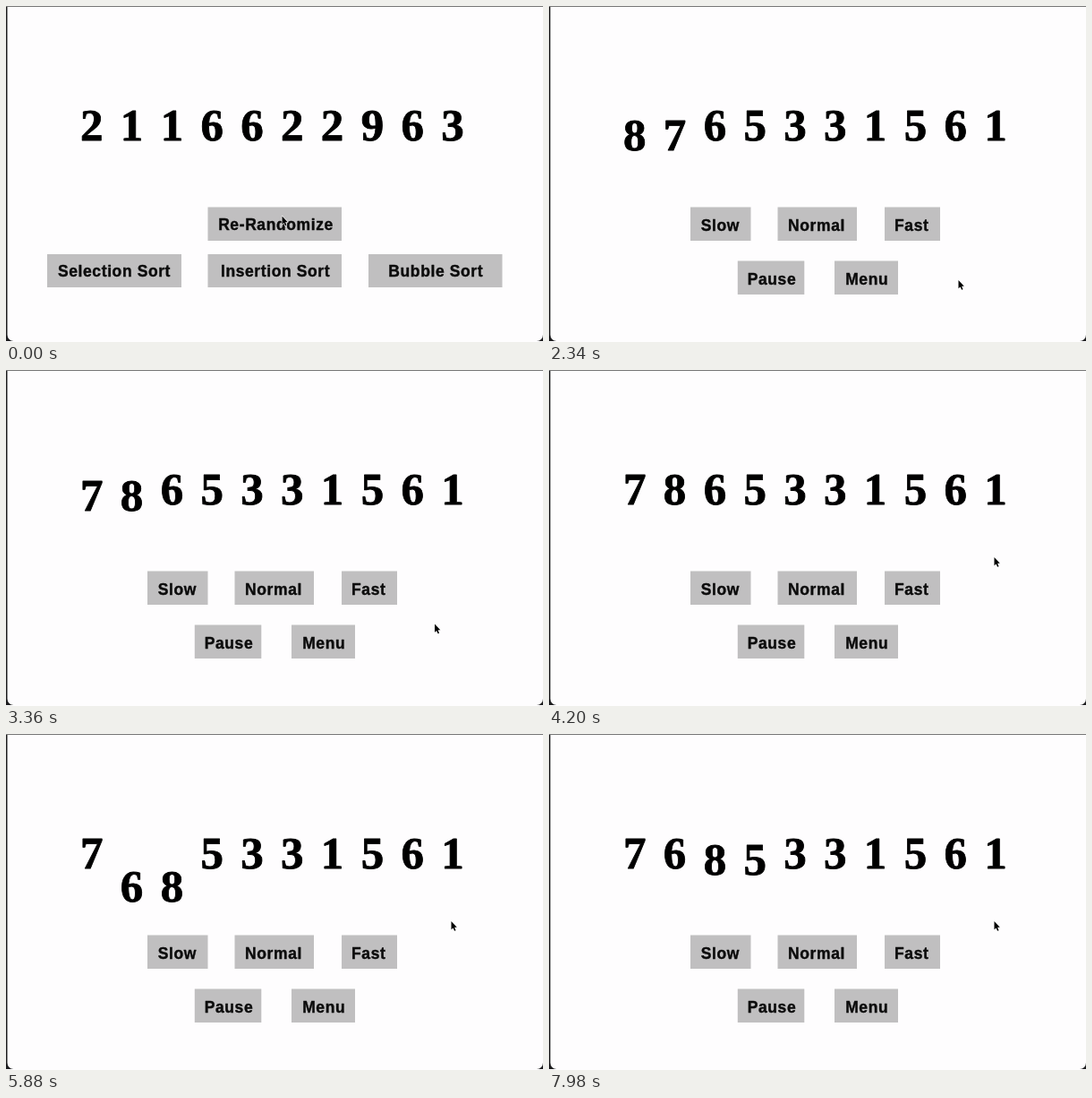
An HTML page with a canvas that plays this animation: 600 px wide and 375 px high, repeating every 8 s.

```html
<!DOCTYPE html>
<html lang="en">
<head>
<meta charset="utf-8">
<title>Sorting demo</title>
<style>
html, body { margin: 0; width: 100%; height: 100%; overflow: hidden; background: #fefdfe; }
canvas { display: block; }
</style>
</head>
<body>
<canvas id="stage" width="600" height="375"></canvas>
<script>
const ctx = document.getElementById('stage').getContext('2d');

const LOOP = 8000, TICK = 60;
const SHUFFLE = 600, MENU = 1440;
const SPEED = 0.125, DEPTH = 52.5, FALL = DEPTH / SPEED, REST = 7.5;
const X0 = 95.8, PITCH = 44.8, BASE = 149.5;
const PAPER = '#fefdfe';

// Each swap: left index, highlight time, start, sideways time, settle and release times
const SWAPS = [
  { i: 0, lit: MENU, start: 2250, side: 270, settle: 3720, off: 4200 },
  { i: 1, lit: 4620, start: 5100, side: 240, settle: 6420, off: 6840 },
  { i: 2, lit: 7200, start: 7920, side: 240, settle: 9240, off: 9660 }
];

// label, left, top, width, height, text centre, baseline
const MAIN = [
  ['Re-Randomize', 225.5, 224.5, 149.5, 37.5, 301.5, 249.5],
  ['Selection Sort', 46, 277, 150, 37, 121, 302],
  ['Insertion Sort', 225.5, 277, 149.5, 37, 301, 302],
  ['Bubble Sort', 405, 277, 149.5, 37, 480.2, 302]
];
const CONTROLS = [
  ['Slow', 158, 224.5, 67.5, 37.5, 191.4, 250.5],
  ['Normal', 255.5, 224.5, 88.5, 37.5, 299, 250.5],
  ['Fast', 375, 224.5, 62, 37.5, 405.2, 250.5],
  ['Pause', 210.8, 284.5, 74.5, 37.5, 249, 310.5],
  ['Menu', 319, 284.5, 71, 37.5, 355.2, 310.5]
];

const clamp = v => Math.max(0, Math.min(1, v));
const mix = (a, b, k) => a + (b - a) * k;

function fillBox(color, x, y, w, h) {
  ctx.fillStyle = color;
  ctx.fillRect(x, y, w, h);
}

// Text thickened by a thin outline
function heavyText(text, x, y, weight) {
  ctx.lineWidth = weight;
  ctx.strokeText(text, x, y);
  ctx.fillText(text, x, y);
}

function drawWindow() {
  fillBox('#1c1c1e', 0, 0, 600, 374);
  fillBox(PAPER, 0, 374, 600, 1);
  fillBox('#777', 0, 0, 600, 1);
  ctx.fillStyle = PAPER;
  ctx.beginPath();
  ctx.roundRect(1.5, 1, 598.5, 373, [0, 0, 7, 7]);
  ctx.fill();
}

function drawButton([label, x, y, w, h, cx, base]) {
  fillBox('#c0bfc0', x, y, w, h);
  ctx.fillStyle = ctx.strokeStyle = '#0c0c0c';
  ctx.font = 'bold 17.5px "Liberation Sans", Arial, sans-serif';
  ctx.letterSpacing = '0.6px';
  heavyText(label, cx, base, 0.4);
  ctx.letterSpacing = '0px';
}

// Sideways progress and drop of a swapping pair
function swapPose(s, t) {
  const dt = t - s.start;
  if (dt <= 0) return { k: 0, drop: 0 };
  if (t >= s.settle) return { k: 1, drop: 0 };
  const up = dt - FALL - s.side;
  return {
    k: clamp((dt - FALL) / s.side),
    drop: up > 0 ? Math.max(REST, DEPTH - up * SPEED) : Math.min(DEPTH, dt * SPEED)
  };
}

function drawDigits(t) {
  const digits = [...(t < SHUFFLE ? '2116622963' : '8765331561')];
  const places = digits.map((d, i) => ({ d, x: i, drop: 0 }));
  for (const s of SWAPS) {
    const lit = (t >= s.lit && t <= s.start) || (t >= s.settle && t < s.off);
    if (lit) {
      for (const n of [s.i, s.i + 1]) fillBox('#ff4a20', 76.2 + n * PITCH, 108.3, 37.5, 49);
    }
    if (t <= s.start) continue;
    const { k, drop } = swapPose(s, t);
    const a = places[s.i], b = places[s.i + 1];
    a.x = s.i + k;
    b.x = s.i + 1 - k;
    a.drop = b.drop = drop;
    places[s.i] = b;
    places[s.i + 1] = a;
  }
  ctx.fillStyle = ctx.strokeStyle = '#000';
  ctx.font = 'bold 51px "Liberation Serif", "Times New Roman", serif';
  for (const p of places) heavyText(p.d, X0 + p.x * PITCH, BASE + p.drop, 0.8);
}

function cursorAt(t) {
  if (t < 3360) {
    const k = clamp((t - 780) / 540), e = k * k * (3 - 2 * k);
    return [mix(308.5, 457.5, e), mix(234.5, 306, e)];
  }
  const k = clamp((t - 3360) / 360), e = k * (2 - k);
  return [mix(479, 497.5, e), mix(283.5, 209, e)];
}

function drawCursor(t) {
  ctx.save();
  ctx.translate(...cursorAt(t));
  ctx.scale(0.9, 0.9);
  ctx.beginPath();
  [[0, 0], [0, 10.3], [2.3, 8.2], [4, 12], [5.6, 11.3], [4, 7.6], [7, 7.4]]
    .forEach(p => ctx.lineTo(...p));
  ctx.closePath();
  ctx.strokeStyle = '#fff';
  ctx.lineWidth = 1.4;
  ctx.stroke();
  ctx.fillStyle = '#000';
  ctx.fill();
  ctx.restore();
}

function draw(t) {
  ctx.textAlign = 'center';
  ctx.lineJoin = 'round';
  drawWindow();
  (t < MENU ? MAIN : CONTROLS).forEach(drawButton);
  drawDigits(t);
  drawCursor(t);
}

const begin = performance.now();
function frame() {
  const t = (performance.now() - begin) % LOOP;
  draw(Math.floor(t / TICK) * TICK);
  requestAnimationFrame(frame);
}
frame();
</script>
</body>
</html>
```
